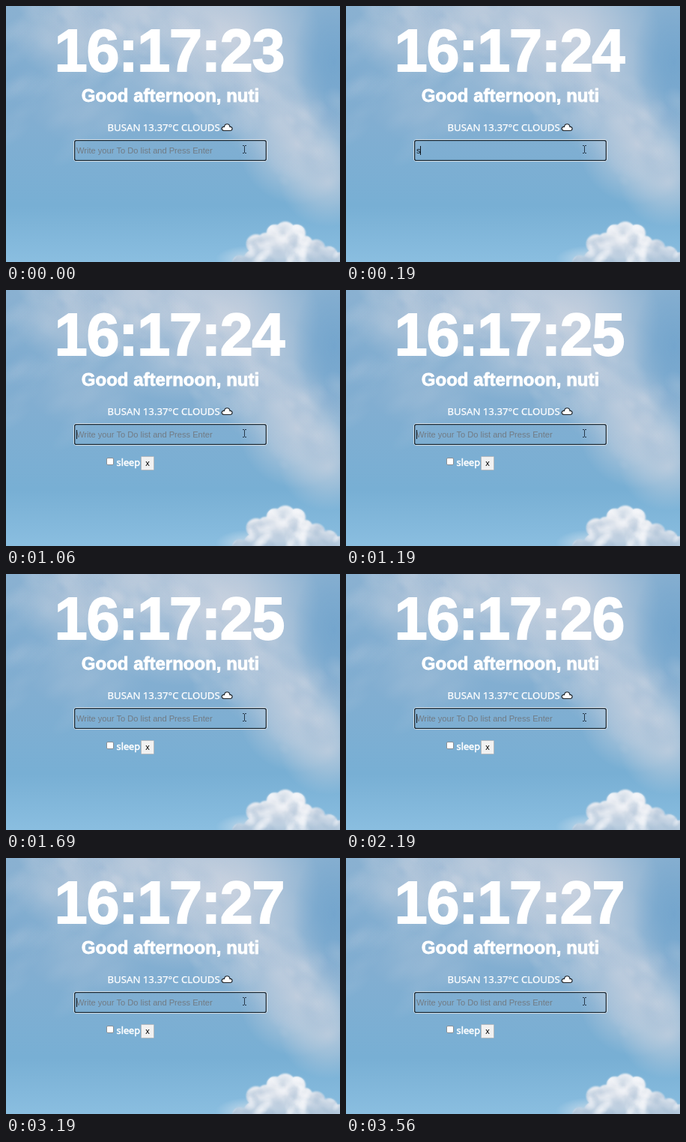
An HTML page with a canvas for the animation above (3.69 s loop, 446 px wide and 342 px high).

```html
<!DOCTYPE html>
<html lang="en">
<head>
<meta charset="utf-8">
<title>Start page</title>
<style>
html, body { margin: 0; width: 100%; height: 100%; overflow: hidden; background: #7fabcf; }
canvas { display: block; }
</style>
</head>
<body>
<canvas id="stage" width="446" height="342"></canvas>
<script>
const W = 446, H = 342, LOOP = 3690;
const SANS = '"Liberation Sans", Arial, sans-serif';
const UI = '"Noto Sans", "Open Sans", sans-serif';
const WORD = 'sleep';
const KEY_TIMES = [100, 270, 400, 560, 690];
const SUBMIT = 980, BLINK = 500, TICK = 190;

const ctx = document.getElementById('stage').getContext('2d');

function seeded(seed) {
  return () => {
    seed = (seed * 1664525 + 1013904223) % 4294967296;
    return seed / 4294967296;
  };
}

// Soft elliptical spot; rgb is "r,g,b"
function puff(c, x, y, rx, ry, rgb, alpha, angle = 0) {
  c.save();
  c.translate(x, y);
  c.rotate(angle);
  c.scale(rx, ry);
  const g = c.createRadialGradient(0, 0, 0, 0, 0, 1);
  g.addColorStop(0, `rgba(${rgb},${alpha})`);
  g.addColorStop(0.5, `rgba(${rgb},${alpha * 0.55})`);
  g.addColorStop(1, `rgba(${rgb},0)`);
  c.fillStyle = g;
  c.fillRect(-1, -1, 2, 2);
  c.restore();
}

function drawHaze(c, rnd) {
  const pale = '212,215,225', blue = '112,163,204';
  const spots = [
    [195, 0, 150, 75, pale, 0.7],
    [310, 40, 110, 100, pale, 0.8],
    [235, 85, 110, 65, pale, 0.45],
    [95, 40, 85, 60, pale, 0.5],
    [110, 135, 80, 50, pale, 0.2],
    [350, 120, 80, 85, pale, 0.5],
    [390, 185, 80, 80, pale, 0.75],
    [430, 235, 65, 60, pale, 0.65],
    [438, 75, 55, 95, blue, 0.8],
    [10, 95, 60, 60, blue, 0.3]
  ];
  for (const s of spots) puff(c, ...s);

  // Broken tufts along the diagonal cloud bank
  for (let i = 0; i < 170; i++) {
    const k = rnd();
    const x = 60 + k * 370 + (rnd() - 0.5) * 120;
    const y = k * k * 190 + rnd() * 90 - 25;
    const r = 6 + rnd() * 18;
    const light = rnd() < 0.65;
    puff(c, x, y, r * 1.5, r, light ? '222,223,230' : '128,168,205',
      0.07 + rnd() * 0.14, 0.6 + rnd() * 0.5);
  }
  for (let i = 0; i < 40; i++) {
    puff(c, rnd() * 150, 20 + rnd() * 180, 30, 13, '185,204,223', 0.12, -0.6);
  }
}

function drawCumulus(c, rnd) {
  const lobes = [
    [334, 318, 13], [347, 314, 11], [359, 303, 11], [373, 301, 13],
    [388, 304, 12], [399, 318, 11], [414, 324, 12], [431, 333, 12],
    [446, 342, 13], [365, 330, 25], [395, 337, 24], [332, 340, 15],
    [312, 343, 10], [420, 345, 20]
  ];
  puff(c, 325, 338, 45, 18, '226,233,241', 0.6);
  c.save();
  c.beginPath();
  for (const [x, y, r] of lobes) {
    c.moveTo(x + r, y);
    c.arc(x, y, r, 0, Math.PI * 2);
  }
  const g = c.createLinearGradient(0, 288, 0, H);
  g.addColorStop(0, '#f0f2f6');
  g.addColorStop(0.5, '#e0e5ed');
  g.addColorStop(1, '#b3c8dc');
  c.fillStyle = g;
  c.filter = 'blur(1px)';
  c.fill();
  c.filter = 'none';
  c.clip();
  for (let i = 0; i < 90; i++) {
    const y = 290 + rnd() * 54;
    const dark = rnd() < (y - 280) / 80;
    puff(c, 300 + rnd() * 146, y, 6 + rnd() * 10, 4 + rnd() * 6,
      dark ? '160,184,208' : '250,250,252', dark ? 0.3 : 0.5, rnd() * 3);
  }
  c.restore();
}

function makeSky() {
  const sky = document.createElement('canvas');
  sky.width = W;
  sky.height = H;
  const c = sky.getContext('2d'), rnd = seeded(71);
  const g = c.createLinearGradient(0, 0, 0, H);
  g.addColorStop(0, '#8ab1d1');
  g.addColorStop(0.45, '#82aed1');
  g.addColorStop(0.78, '#78afd4');
  g.addColorStop(1, '#8abee0');
  c.fillStyle = g;
  c.fillRect(0, 0, W, H);
  drawHaze(c, rnd);
  drawCumulus(c, rnd);
  return sky;
}

function label(text, x, y, font, color, align = 'left', stroke = 0) {
  ctx.font = font;
  ctx.textAlign = align;
  ctx.fillStyle = color;
  ctx.fillText(text, x, y);
  if (stroke) {
    ctx.strokeStyle = color;
    ctx.lineWidth = stroke;
    ctx.strokeText(text, x, y);
  }
}

function box(x, y, w, h, r, color, width, fill) {
  ctx.beginPath();
  ctx.roundRect(x, y, w, h, r);
  if (fill) {
    ctx.fillStyle = fill;
    ctx.fill();
  }
  ctx.strokeStyle = color;
  ctx.lineWidth = width;
  ctx.stroke();
}

function drawClock(t) {
  const sec = 23 + Math.max(0, Math.floor((t - TICK) / 1000) + 1);
  ctx.letterSpacing = '-1.2px';
  label('16:17:' + sec, 218, 86.5, `bold 79px ${SANS}`, '#fff', 'center', 1.8);
  ctx.letterSpacing = '0px';
}

function drawCloudIcon() {
  ctx.beginPath();
  ctx.moveTo(291, 166.5);
  ctx.bezierCurveTo(286.5, 166, 288, 160.5, 291.5, 161.5);
  ctx.bezierCurveTo(292, 156.5, 298.5, 156.5, 299, 161.5);
  ctx.bezierCurveTo(303, 161, 303, 166.5, 299.5, 166.5);
  ctx.closePath();
  ctx.fillStyle = '#fff';
  ctx.fill();
  ctx.strokeStyle = '#1c2126';
  ctx.lineWidth = 1.2;
  ctx.stroke();
}

function drawPointer() {
  ctx.fillStyle = '#26384a';
  ctx.fillRect(318, 187, 1, 9);
  for (const y of [186, 196]) {
    ctx.fillRect(316, y, 2, 1);
    ctx.fillRect(319, y, 2, 1);
  }
}

function drawInput(t) {
  box(90.5, 178.5, 258, 29, 3.5, 'rgba(255,255,255,0.7)', 1);
  box(91.6, 179.6, 255.8, 26.8, 2.5, '#1b2833', 1.3);

  const typing = t >= KEY_TIMES[0] && t < SUBMIT;
  const font = `11.1px ${SANS}`;
  let caretX = 94;
  if (typing) {
    const typed = WORD.slice(0, KEY_TIMES.filter(k => t >= k).length);
    label(typed, 94, 197, font, '#101820');
    caretX += ctx.measureText(typed).width;
  } else {
    label('Write your To Do list and Press Enter', 94, 197, font, '#717a83');
  }
  const blinkOn = t >= SUBMIT && Math.floor((t - SUBMIT) / BLINK) % 2 === 0;
  if (typing || blinkOn) {
    ctx.fillStyle = '#101820';
    ctx.fillRect(Math.floor(caretX), 187, 1, 12);
  }
  drawPointer();
}

function drawTodo() {
  box(134.5, 224.5, 9, 9, 1.5, '#8a8f95', 1, '#fff');
  label(WORD, 147.6, 235, `500 12.7px ${UI}`, '#fff', 'left', 0.5);
  box(180.5, 222.5, 17, 18, 1, '#b4b9be', 1, '#f1f1f1');
  label('x', 189, 235, `11.1px ${SANS}`, '#000', 'center');
}

const sky = makeSky();

function draw(t) {
  ctx.drawImage(sky, 0, 0);
  drawClock(t);
  label('Good afternoon, nuti', 219.5, 128, `bold 24px ${SANS}`, '#fff', 'center', 0.8);
  label('BUSAN 13.37°C CLOUDS', 135.5, 167, `500 13.2px ${UI}`, '#fff', 'left', 0.25);
  drawCloudIcon();
  drawInput(t);
  if (t >= SUBMIT) drawTodo();
}

const start = performance.now();
function loop(now) {
  draw(Math.max(0, now - start) % LOOP);
  requestAnimationFrame(loop);
}
draw(0);
requestAnimationFrame(loop);
</script>
</body>
</html>
```
